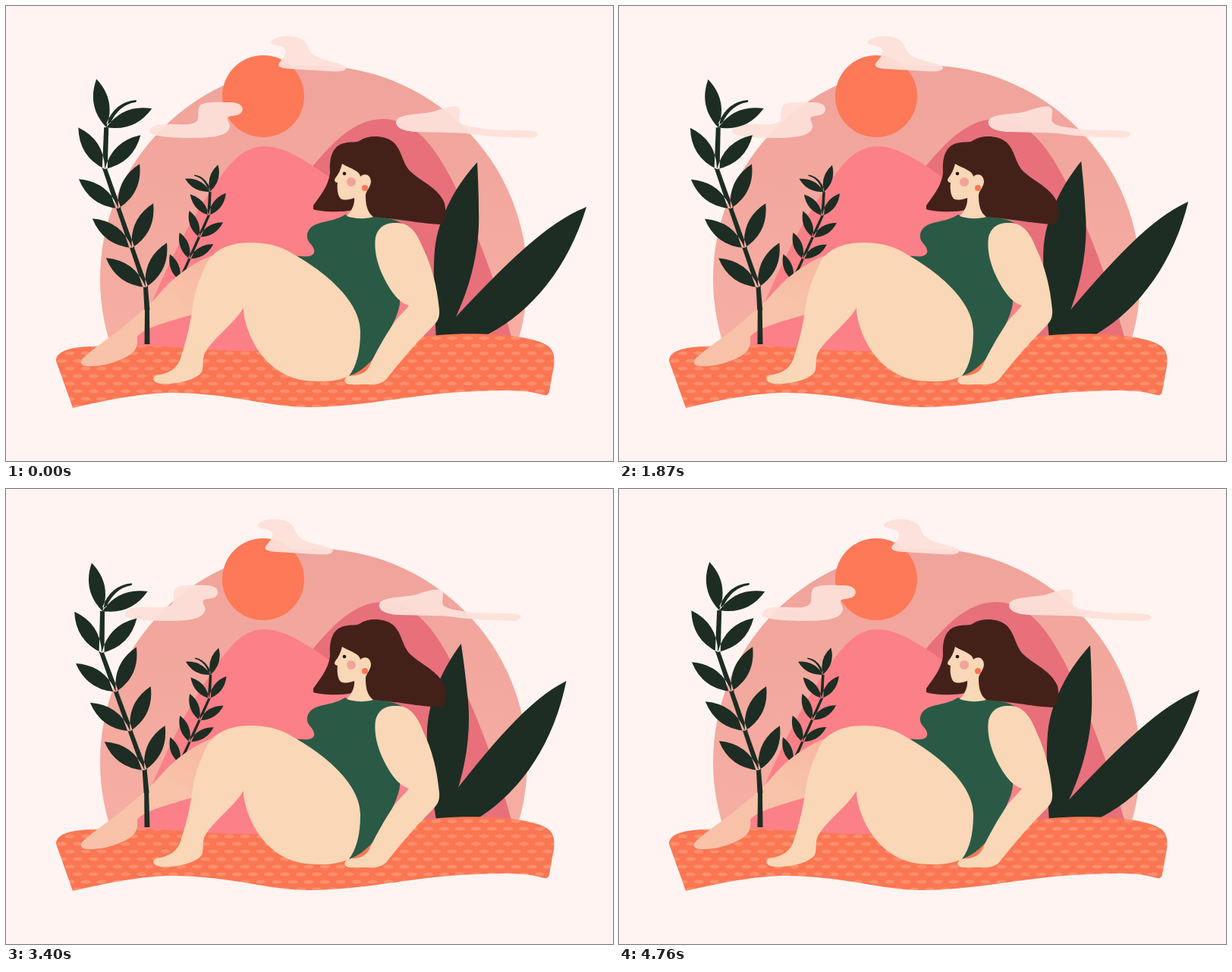
Recreate the animation shown at these times as an HTML page. Size 800 by 600 pixels, loop 4.93 s.

```html
<!DOCTYPE html>
<html lang="en">
<head>
<meta charset="utf-8">
<title>Sunset rest</title>
<style>
  html, body { margin: 0; width: 100%; height: 100%; overflow: hidden; background: #fff4f1; }
  svg { display: block; width: 800px; height: 600px; }
  .cloud { fill: #fde1da; fill-opacity: .94; }
  .skin { fill: #fad7b6; }
  .plant { fill: #1d2d23; }
</style>
</head>
<body>
<svg viewBox="0 0 800 600">
  <defs>
    <linearGradient id="sky" x1="0" y1="0" x2="0" y2="1">
      <stop offset="0" stop-color="#f0a39a"/>
      <stop offset=".65" stop-color="#f6aea3"/>
    </linearGradient>
    <linearGradient id="shin" x1="0" y1="1" x2="1" y2="0">
      <stop offset="0" stop-color="#f7c2a9"/>
      <stop offset=".6" stop-color="#f8c3a8"/>
      <stop offset="1" stop-color="#f7b59f"/>
    </linearGradient>
    <pattern id="weave" width="21" height="20" patternUnits="userSpaceOnUse" y="3">
      <rect width="21" height="20" fill="#fc7654"/>
      <g fill="#fd906c">
        <ellipse cx="10.5" cy="5" rx="6.5" ry="2.5"/>
        <ellipse cx="0" cy="15" rx="6.5" ry="2.5"/>
        <ellipse cx="21" cy="15" rx="6.5" ry="2.5"/>
      </g>
    </pattern>
    <path id="sprig"/>
  </defs>

  <circle cx="405.5" cy="360" r="281.5" fill="url(#sky)" clip-path="inset(0 0 200px 0)"/>
  <circle cx="339" cy="119" r="54" fill="#fd7957"/>
  <path fill="#e7707b" d="M397 220C428 182 458 149 497 149C540 149 566 188 588 230C618 290 648 370 667 440H400Z"/>
  <path fill="#fc8088" d="M163 460C200 370 235 290 275 237C295 205 315 185 340 185C370 185 400 208 430 228L520 300L550 460Z"/>

  <path id="cloudLeft" class="cloud" d="M190 163C192 156 205 155 225 156C240 157 252 156 253 148C254 142 252 137 256 131C262 125 285 127 298 127C312 128 314 136 310 141C305 146 292 144 292 148C292 154 297 155 294 162C290 172 270 174 245 174C220 174 200 172 192 169C188 167 189 165 190 163Z"/>
  <path id="cloudTop" class="cloud" d="M350 46C360 37 385 38 394 47C400 54 398 60 408 66C420 73 440 74 448 80C450 86 440 87 425 86L375 83C362 82 356 80 361 74C366 68 373 60 366 55C362 52 350 53 349 48Z"/>
  <path id="cloudRight" class="cloud" d="M515 150C520 143 540 143 560 140C575 136 585 131 595 133C602 137 596 145 598 152C600 158 615 160 640 163C665 164 690 163 699 166C703 170 700 174 690 174C660 173 640 172 620 170C600 166 570 167 540 166C520 165 511 158 515 150Z"/>

  <path id="bladeB" class="plant" d="M765 265C715 284 660 338 591 412L575 470H600L635 433C695 402 742 342 765 265Z"/>
  <path id="bladeA" class="plant" d="M621 206C592 238 569 280 565 322C562 362 565 400 567 440H592V412C612 370 625 320 623 270C623 245 622 225 621 206Z"/>
  <g id="smallPlant" class="plant">
    <use href="#sprig" transform="translate(229 362) rotate(5) scale(-.57 .57)"/>
  </g>

  <path fill="url(#weave)" d="M66 468C66 455 85 450 110 449C200 444 250 455 320 455C420 455 500 440 570 434C620 430 690 433 712 447C724 453 723 468 722 475L716 508C715 514 711 514 705 512C680 505 650 507 600 509C530 513 470 529 400 529C345 529 300 511 220 510C180 510 130 520 88 530Z"/>

  <path fill="url(#shin)" d="M278 327C248 336 222 357 206 375C190 395 168 411 150 427C130 442 115 452 103 463C96 469 98 475 108 475C125 476 145 470 160 462C172 455 174 448 173 436C182 424 215 416 245 407L290 345Z"/>
  <path fill="#2a5a45" d="M447 275C437 282 424 283 411 287C398 291 393 303 400 312C408 320 409 328 399 330C390 331 384 328 379 331L400 420L452 488C475 480 490 460 500 440C510 420 520 400 519 388L525 290C520 283 505 280 484 277C472 281 458 281 447 275Z"/>
  <path class="skin" d="M262 345C270 322 295 311 325 312C350 313 365 318 380 328C420 350 468 390 467 430C467 455 462 475 452 488C435 496 415 496 395 494C360 490 335 465 322 435C314 415 313 405 313 398C300 420 270 440 261 460C258 472 262 480 255 486C245 494 225 499 205 498C193 497 192 490 198 487C215 485 225 478 230 465C238 440 243 420 246 395C249 375 255 360 262 345Z"/>

  <path fill="#432119" d="M405 263C414 250 425 238 427 220C426 200 430 185 445 181C455 178 462 181 467 177C480 169 502 171 512 181C523 193 522 208 534 219C548 232 570 240 578 260C581 275 579 286 572 288C550 287 530 283 510 281C500 280 490 278 483 278L457 269C440 273 412 271 405 268Z"/>
  <path class="skin" d="M443 208C441 216 438 222 434 227C432 230 433 232 437 233C436 240 437 250 441 254C446 257 454 255 459 253C460 263 454 272 449 277C460 281 475 281 484 278C476 272 474 262 474 250C474 244 480 240 481 232C481 222 472 220 467 225C466 217 455 215 443 208Z"/>
  <circle cx="455" cy="232" r="6" fill="#f2a39b"/>
  <circle cx="446" cy="221" r="2.3" fill="#24170f"/>
  <circle cx="473" cy="240" r="4" fill="#fb7551"/>
  <path class="skin" d="M512 286C530 285 540 295 550 320C562 345 568 370 571 400C572 412 568 417 560 425C535 450 515 475 503 490C497 498 490 499 478 499H452C444 498 445 490 452 488C462 487 472 486 478 477C488 455 500 435 511 418C518 408 526 402 531 395C515 390 503 370 495 352C488 335 485 320 487 305C490 292 500 286 512 286Z"/>

  <g id="bigPlant" class="plant">
    <use href="#sprig" transform="translate(184 371)"/>
  </g>
</svg>
<script>
const $ = id => document.getElementById(id);

// Point at a distance from (x, y), with the angle in degrees clockwise from straight up.
function polar(x, y, length, degrees) {
  const a = degrees * Math.PI / 180;
  return [x + length * Math.sin(a), y - length * Math.cos(a)];
}

// Almond between two points, bulging by half the width on each side.
function almond([x0, y0], [x1, y1], width) {
  const s = width / Math.hypot(x1 - x0, y1 - y0);
  const control = side => [(x0 + x1) / 2 - side * (y1 - y0) * s, (y0 + y1) / 2 + side * (x1 - x0) * s];
  return `M${x0} ${y0}Q${control(1)} ${x1} ${y1}Q${control(-1)} ${x0} ${y0}Z`;
}

// Stem piece as a slim bar.
const bar = ([x0, y0], [x1, y1]) => `M${x0 - 3.5} ${y0}L${x1 - 3} ${y1}H${x1 + 3}L${x0 + 3.5} ${y0}Z`;

// Five pairs of leaves; the stem leans left, then curls back near the top.
function sprig() {
  let node = [0, 0], shape = bar([2, 75], [2, 30]) + bar([2, 30], node);
  for (let i = 0; i < 5; i++) {
    const tilt = -14 + 21 * Math.max(0, i - 2);
    for (const side of [-1, 1]) shape += almond(node, polar(...node, 65, tilt + side * 39.5), 20);
    if (i === 4) break;
    const next = polar(...node, 55, tilt - 5);
    shape += bar(node, next);
    node = next;
  }
  const [x, y] = node;
  return shape + `M${x} ${y - 5}Q${x + 12} ${y - 34} ${x + 39} ${y - 36}Q${x + 41} ${y - 34} ${x + 38} ${y - 33}Q${x + 17} ${y - 30} ${x + 5} ${y - 5}Z`;
}
$('sprig').setAttribute('d', sprig());

const STEP = 170, STEPS = 29, TURN = 15;

const swing = (phase, period) => (1 - Math.cos(2 * Math.PI * phase / period)) / 2;
const turn = (id, angle, x, y) => $(id).setAttribute('transform', `rotate(${angle} ${x} ${y})`);
const shift = (id, x) => $(id).setAttribute('transform', `translate(${x} 0)`);

function draw() {
  const step = Math.floor(performance.now() / STEP) % STEPS;
  // The second half covers 15 beats in 13 steps.
  const late = Math.max(0, step - TURN);
  const brisk = step + Math.min(2, late * .4);
  const steady = step + late * 2 / 13;

  const bend = -5.38 * swing(brisk, 15);
  turn('bladeA', bend, 589, 433);
  turn('bladeB', bend, 625, 545);
  turn('bigPlant', -3 * swing(brisk, 10), 186, 446);
  turn('smallPlant', 5.2 * swing(steady, 10), 226, 386);

  const drift = late ? 1 - swing(late, 26) : 1 - (1 - step / TURN) ** 1.33;
  shift('cloudLeft', -48 * drift);
  shift('cloudTop', -26 * drift);
  shift('cloudRight', -33 * drift);
  requestAnimationFrame(draw);
}
draw();
</script>
</body>
</html>
```
